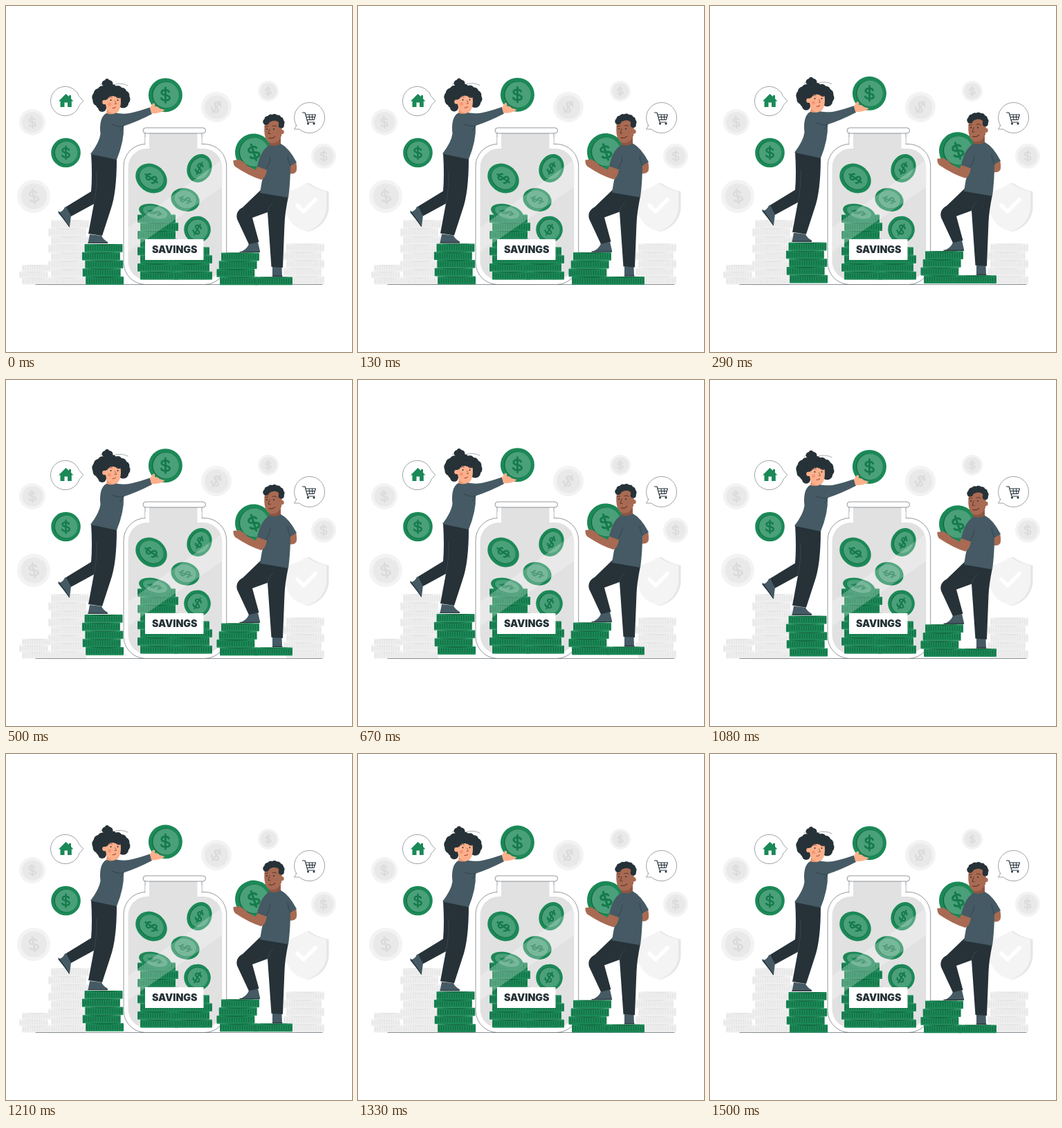
Write an HTML page that moves like this. It is 500x500 px and loops after 1540 ms.

```html
<!DOCTYPE html>
<html lang="en">
<head>
<meta charset="utf-8">
<title>Savings</title>
<style>
html, body { margin: 0; width: 100%; height: 100%; overflow: hidden; background: #fff; }
svg { display: block; width: 100vw; height: 100vh; }
text { font: 900 14.2px Inter, sans-serif; }
</style>
</head>
<body>
<svg id="stage" viewBox="0 0 500 500"></svg>
<script>
const INK = '#263238', SLATE = '#455a64', GREEN = '#1b8957', DEEP = '#12643d';
const PEACH = '#fdb08c', BROWN = '#a86a52', LOOP = 1540, PEAK = 680, RISE = 6;

const shape = (d, fill, extra = '') => `<path d="${d}" fill="${fill}" ${extra}/>`;
const line = (d, color, width = 1) =>
  `<path d="${d}" fill="none" stroke="${color}" stroke-width="${width}" stroke-linecap="round" stroke-linejoin="round"/>`;
const oval = (x, y, rx, ry, fill) => `<ellipse cx="${x}" cy="${y}" rx="${rx}" ry="${ry}" fill="${fill}"/>`;
const dot = (x, y, r, fill) => oval(x, y, r, r, fill);
const box = (x, y, w, h, r, fill, outline = 0) =>
  `<rect x="${x}" y="${y}" width="${w}" height="${h}" rx="${r}" fill="${fill}" stroke="${INK}" stroke-width="${outline}"/>`;
const repeat = (count, draw) => Array.from({ length: count }, (_, i) => draw(i)).join('');

const DOLLAR = 'M5-4.5C3.5-8.5-5.5-8-5.5-3.5C-5.5 1 6-1 6 4C6 8.5-4 8.5-6 4.5M0-10.5V10.5';

function coin(x, y, rx, ry, turn, gray) {
  const [rim, edge, face, sign] = gray
    ? ['#f3f3f3', '#ededed', '#e9e9e9', '#dbdbdb']
    : [GREEN, DEEP, '#49a079', '#167a4b'];
  return `<g transform="translate(${x} ${y}) rotate(${turn}) scale(${rx / 24} ${ry / 24})">
    ${dot(0, 0, 24, rim)}${dot(0, 0, 18.8, edge)}${dot(.7, 0, 18.4, face)}${line(DOLLAR, sign, 2.7)}</g>`;
}
const grayCoin = (x, y, r, turn) => coin(x, y, r, r, turn, true);

function slab(x, y, width, height, gray) {
  const [fill, dark] = gray ? ['#efefef', '#e2e2e2'] : [GREEN, DEEP];
  return box(x, y, width, height, 1, fill)
    + `<path d="M${x + 1.5} ${y + height / 2}h${width - 3}" stroke="${dark}" stroke-width="${height * .62}" stroke-dasharray=".9 2.5"/>`
    + shape(`M${x + 6} ${y}h${width - 12}q${6 - width / 2} 4 ${12 - width} 0`, dark, 'opacity=".8"');
}

// Every second slab is pushed aside by sway; lean slides each row a little further
function stack(x, top, count, sway, { lean = 0, width = 55, height = 11.75, gray = false } = {}) {
  return repeat(count, i => slab(x + i % 2 * sway + i * lean, top + i * height, width, height, gray));
}

// Curls along an elliptical arc, angles in degrees clockwise from the right
function curls(x, y, rx, ry, from, to, count, size) {
  return repeat(count, i => {
    const angle = (from + (to - from) * i / (count - 1)) * Math.PI / 180;
    return dot(x + rx * Math.cos(angle), y + ry * Math.sin(angle), size * (1 + .12 * Math.sin(i * 7)), INK);
  });
}

const eyes = (x, y, gap) => dot(x, y, 1, INK) + dot(x + gap, y, 1, INK);

const SHIELD = 'M434 255.5Q447 265 463 268V294Q459 318 434 326Q404 317 404 288V268Q420 266 434 255.5Z';
const backdrop =
  grayCoin(38, 168, 19, -5) + grayCoin(40, 275, 24, -10) + grayCoin(304, 146, 22, 35)
  + grayCoin(379, 123, 15, 0) + grayCoin(459, 217, 18, 0)
  + shape(SHIELD, '#e6e6e6', 'transform="translate(3.5)"') + shape(SHIELD, '#f4f4f4')
  + line('M421 288l9 9l17-17', '#fff', 5.5)
  + stack(65, 309.5, 8, -4, { gray: true })
  + stack(23, 374, 3, -4, { gray: true, width: 42, height: 9.5 })
  + stack(405, 343.5, 5, -4, { gray: true })
  + line('M43 402.5H457', '#59636a', .7)
  + coin(86.5, 212, 21.3, 21.3, 0);

const bubbles =
  line('M105.5 130A21.2 21.2 0 1 0 106 143.500L111.5 137.5Z', INK, .45)
  + shape('M76 137.5L86.5 127L91 131V129H94V134L97.5 137.5H94.8V146H89V139.5H84.5V146H78.5V137.5Z', GREEN)
  + line('M419.5 172.500A22 22 0 1 1 424 178H416.5Q419 175 419.5 172.5Z', INK, .45)
  + line('M428.5 154H432L436 168H446M433 157H447.5L445 164.5H435M438 157L439 164M442.5 157V164M434 160.5H446', INK, 1.1)
  + dot(436.5, 170, 1.5, INK) + dot(445, 170, 1.5, INK);

const jar =
  box(201, 180, 82, 26, 2, '#fff', .5)
  + box(170, 199.5, 148.7, 203, 32, '#fff', .5)
  + box(201.3, 190, 81.4, 20, 0, '#fff')
  + box(176.5, 206, 135.8, 190, 27, '#e1e1e1')
  + box(207, 184, 69.5, 25, 0, '#e1e1e1')
  + box(198, 176, 90.5, 8, 4, '#fff', .5)
  + stack(190, 301.5, 8, 4) + stack(239, 348.5, 4, 4)
  + coin(210, 249, 20, 24, -55) + coin(279.5, 234.5, 17.5, 21, 25) + coin(259, 280, 16.5, 21, -73)
  + coin(215.5, 298.5, 11.5, 24, -75) + coin(276.5, 323, 19.3, 19.3, 30)
  + shape('M312 222V262L177 355V320Z', '#fff', 'opacity=".25"')
  + box(201, 337, 84.5, 30, 0, '#fff')
  + `<text x="243.7" y="357" text-anchor="middle" textLength="auto" fill="${INK}">SAVINGS</text>`;

const woman =
  stack(113.5, 344, 5, -4, { lean: .4 })
  + shape('M88 290L94 303L92 319L75 298.5Q83 297 85 290.5Z', SLATE)
  + line('M76 297L91.5 319', INK, 1.2)
  + shape('M121 330L138 332Q140 337 147 341V343H118.5Z', SLATE)
  + line('M119 342.5H146.5', INK, 1.2)
  + shape('M123 213L160 221Q160 270 151 295L139 332L119 329L127 286L94 304L87 290L123 268Q125 245 123 213Z', INK)
  + line('M131 240Q132 262 127 286', '#455159', .6)
  + oval(146.5, 112, 8, 5.5, INK) + dot(146, 108, 3, INK)
  + oval(151, 133, 20, 14, INK) + curls(152, 133, 20, 13.5, 140, 390, 12, 7) + dot(139, 147, 6, INK)
  + line('M136 114Q148 103 155 114Q166 110 176 115', INK, .4)
  + shape('M146 145H159V158Q151 160 145 156Z', '#ed9875')
  + shape('M144 131C147 124 163 123 165.5 132C167 142 165 154 157 156Q146 155 144 143Z', PEACH)
  + dot(142.5, 139, 3.3, PEACH)
  + curls(154, 133, 11, 8, 195, 325, 5, 4.8)
  + eyes(151.5, 136, 10)
  + line('M148.5 132.5Q151 130.5 153.5 132M160 131.5L164 132.5M157.5 137L159.5 141.5H157', '#70443a', .7)
  + dot(149.5, 142, 2.5, '#f69579')
  + line('M154 147.5Q157 148 158.5 146', '#b23f38', 1.1)
  + shape('M145 155Q152 158 159 154.500C172 157 180 156 208 146.5L211 156Q190 167 170 173.5Q171 195 160 222L122 214Q135 197 136.5 185C135 171 137 159 145 155Z', SLATE)
  + line('M153 171Q164 176 170 173.5M165 181L170 174', '#2c3c44', .7)
  + coin(230.4, 128.7, 24.5, 24.5, 0)
  + shape('M208 147L212 141Q216 139 215 145Q220 145 222 148L229 150Q229 152 222 154Q214 156 210 155Z', PEACH);

const man =
  stack(311, 356.5, 3, 0, { lean: -3.3 }) + stack(309, 391.5, 1, 0) + stack(359, 391.5, 1, 0)
  + shape('M385 377H398.5L399 391H385Z', SLATE)
  + line('M385.5 390.5H399', INK, 1.3)
  + shape('M351 344L364 341L367 354V356H337.5Q348 352 351 344Z', SLATE)
  + line('M338 355.5H366.5', INK, 1.2)
  + shape('M368 266L408 275Q403 300 402.5 315L400 378L383.5 377L378 298L356 306L365.5 341L351 344.5L334 308Q331 297 342 291Z', INK)
  + line('M378 298Q379 290 386 284', '#455159', .6)
  + shape('M411 229L419 225Q421 234 419.5 239Q416 244 409 242Z', BROWN)
  + coin(358, 211.5, 27, 27, -18)
  + shape('M380 190L397 184V201Q389 207 380 202Z', '#8e5643')
  + shape('M374 169C377 160 398 162 399 172L398 188Q393 200 382 198C374 196 372 183 374 169Z', BROWN)
  + dot(398.5, 182, 3.2, BROWN)
  + curls(387, 169.5, 11.5, 8.5, 195, 380, 8, 4.6)
  + eyes(377, 178, 10)
  + line('M374.5 174.5L378.5 174M385 173.5Q388 172 391 174M381 178L379 184.5H382', '#53291f', .8)
  + line('M380 191Q385 192.5 389 189', '#5a241e', 1)
  + shape('M381 201Q390 204 397 199Q409 205 420 226L411 231Q411 255 408 277L367 270Q369 254 374 237L363 232Q368 208 381 201Z', SLATE)
  + line('M376 235Q382 226 382 219M411 231Q407 223 407 217', '#2c3c44', .7)
  + shape('M363 232L377 237Q375 249 369 251Q352 246 331 232Q328 228 328.5 223L337 222Q344 225 349 231L361 237Z', BROWN);

const stage = document.getElementById('stage');
stage.innerHTML = `${backdrop}${bubbles}${jar}<g id="mover">${woman}${man}</g>`;
const mover = document.getElementById('mover');

function draw(now) {
  const t = now % LOOP;
  const phase = t < PEAK ? t / PEAK : 1 + (t - PEAK) / (LOOP - PEAK);
  const lift = RISE * (1 - Math.cos(Math.PI * phase)) / 2;
  mover.setAttribute('transform', `translate(0 ${-lift})`);
  requestAnimationFrame(draw);
}
requestAnimationFrame(draw);
</script>
</body>
</html>
```
